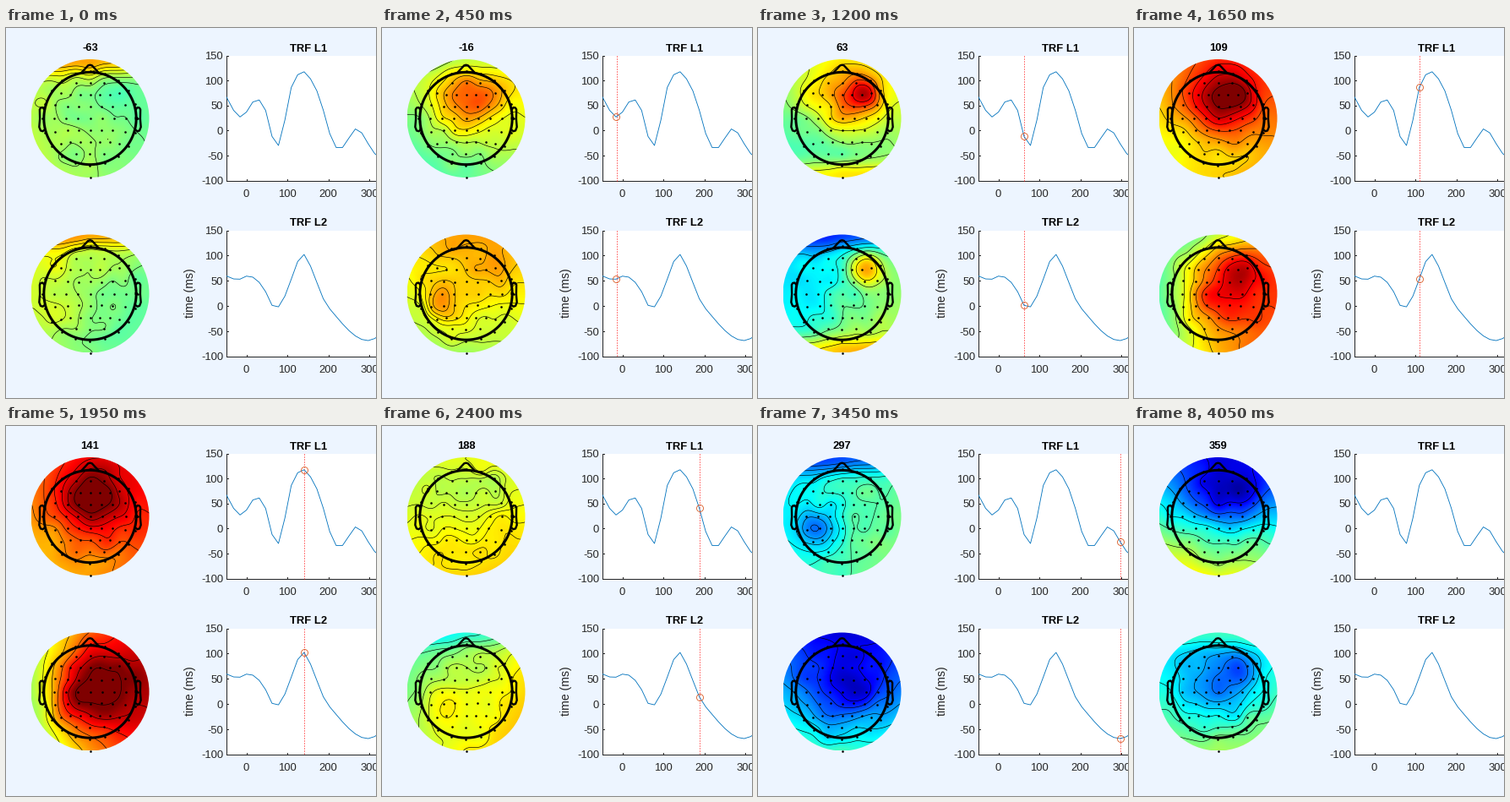
Write a matplotlib script that moves like this. It is 438 px wide and 438 px high and loops after 4200 ms.

```python
import numpy as np
import matplotlib.pyplot as plt
from matplotlib.animation import FuncAnimation
from matplotlib.colors import ListedColormap
from matplotlib.patches import Circle, Rectangle

SIZE, FRAMES, STEP_MS = 438, 28, 150
START, RATE = -62.5, 15.625      # ms of signal, at the start and per frame
PT = 72 / 73                     # one pixel in points at 73 dpi
INK = "#262626"
DISC, SCALE = 70, 110            # map radius, pixels per head unit

plt.rcParams["font.family"] = "Liberation Sans"
fig = plt.figure(figsize=(6, 6), dpi=73, facecolor=(0.93, 0.96, 1))
ax = fig.add_axes([0, 0, 1, 1])
ax.set_xlim(0, SIZE)
ax.set_ylim(SIZE, 0)
ax.axis("off")
ax.set_autoscale_on(False)


def jet():
    v = np.linspace(0, 1, 256)[:, None]
    return ListedColormap(np.clip(1.5 - np.abs(4 * v - [3, 2, 1]), 0, 1))


def label(x, y, text, size=13, **kw):
    kw = {"ha": "center", "va": "baseline", "color": INK, **kw}
    return ax.text(x, y, text, fontsize=size * PT, **kw)


def line(x, y, color, width, **kw):
    return ax.plot(x, y, color=color, lw=width * PT, **kw)[0]


def glide(keys, values, at):
    """Smooth cubic path through key values."""
    k, v = np.array(keys, float), np.array(values, float)
    slope = np.gradient(v, k, axis=0)
    i = np.clip(np.searchsorted(k, at, "right") - 1, 0, len(k) - 2)
    h = k[i + 1] - k[i]
    u = (at - k[i]) / h
    return (((1 + 2 * u) * v[i] + h * u * slope[i]) * (1 - u) ** 2
            + ((3 - 2 * u) * v[i + 1] - h * (1 - u) * slope[i + 1]) * u ** 2)


# ---- scalp maps -------------------------------------------------------

def electrodes():
    """Cap positions from inclination and azimuth, in map radii."""
    quarter = [(92, 72), (92, 54), (74, 68), (50, 68), (60, 51), (75, 41),
               (92, 36), (92, 18), (72, 21), (50, 28), (32, 45)]
    spots = [(0, 0), (115, -90)]
    spots += [(inc, az) for inc in (23, 46, 69, 92)
              for az in (0, 90, 180, 270)]
    for inc, az in quarter:
        spots += [(inc, a) for a in (az, -az, 180 - az, az - 180)]
    inc, az = np.array(spots).T
    r, a = inc / 180 * SCALE / DISC, np.radians(az)
    return np.c_[r * np.cos(a), r * np.sin(a)]


axis = np.linspace(-1, 1, 81)
GX, GY = np.meshgrid(axis, axis)
INSIDE = np.hypot(GX, GY) <= 1
CAP = electrodes()


def blob(x, y, radius):
    return np.exp(-((GX - x) ** 2 + (GY - y) ** 2) / radius ** 2)


def strip(edge):
    return np.exp(-((GY - edge) / .25) ** 2)


RIPPLE = np.array([blob(x, y, .16) for x, y in CAP])
rng = np.random.default_rng(4)

# strength of each spatial mode at the key frames
KEYS = [0, 3, 8, 13, 18, 23, 27]
COURSE_1 = {
    "level": [.52, .55, .52, .78, .48, .43, .38],
    "front": [-.01, .08, .08, .06, -.12, -.03, -.24],
    "right": [-.04, .05, .04, .06, 0, .06, -.05],
    "core": [-.02, .20, .20, .25, -.20, .02, -.20],
    "spot": [-.03, .05, .26, 0, 0, 0, -.10],
    "left": [0, 0, -.04, 0, 0, -.18, 0],
    "brow": [.20, -.10, 0, 0, .06, -.20, 0]}
COURSE_2 = {
    "level": [.53, .61, .44, .70, .47, .30, .44],
    "front": [.03, .08, -.04, .02, -.10, -.14, -.10],
    "right": [-.05, .02, .08, .20, 0, -.02, .02],
    "core": [0, .04, 0, .36, -.25, -.20, -.18],
    "spot": [0, .04, .28, 0, 0, 0, -.12],
    "left": [.02, .12, -.05, .05, .08, 0, 0],
    "brow": [.16, .02, -.22, 0, -.20, -.04, .12]}


class Scalp:
    def __init__(self, cx, cy, core, course):
        self.cx, self.cy, self.course = cx, cy, course
        self.modes = {
            "level": np.ones_like(GX), "front": GY, "right": GX,
            "core": blob(*core), "spot": blob(.4, .42, .28),
            "left": blob(-.42, -.2, .35), "brow": strip(1)}
        self.noise = rng.normal(0, .014, (len(KEYS), len(CAP)))
        self.disc = ax.add_patch(Circle((cx, cy), DISC, fc="none", ec="none"))
        self.image = ax.imshow(
            GX, cmap=jet(), vmin=0, vmax=1, aspect="auto",
            extent=(cx - DISC, cx + DISC, cy + DISC, cy - DISC),
            origin="lower", interpolation="bilinear", zorder=1)
        self.image.set_clip_path(self.disc)
        self.lines = None
        self.outline()

    def outline(self):
        def stroke(x, y, width):
            line(self.cx + SCALE * np.array(x), self.cy - SCALE * np.array(y),
                 "k", width, zorder=4)

        a = np.linspace(0, 2 * np.pi, 200)
        stroke(.497 * np.cos(a), .497 * np.sin(a), 3)
        stroke([.09, .02, 0, -.02, -.09], [.495, .57, .575, .57, .495], 2.4)
        ear_x = np.array([.492, .51, .53, .542, .54, .547, .532, .51, .484])
        ear_y = [.0955, .1175, .1146, .0955, -.0055, -.0932, -.1313,
                 -.1384, -.1199]
        for side in (1, -1):
            stroke(side * ear_x, ear_y, 2.4)
        ax.scatter(self.cx + DISC * CAP[:, 0], self.cy - DISC * CAP[:, 1],
                   s=(2.6 * PT) ** 2, c="k", lw=0, zorder=5)

    def field(self, frame):
        z = np.tensordot(glide(KEYS, self.noise, frame), RIPPLE, 1)
        for name, mode in self.modes.items():
            z = z + glide(KEYS, self.course[name], frame) * mode
        return z + .2 * np.exp(-((frame - 8) / 2.5) ** 2) * strip(-1)

    def show(self, frame):
        z = self.field(frame)
        self.image.set_data(z)
        if self.lines:
            self.lines.remove()
        levels = np.linspace(z[INSIDE].min(), z[INSIDE].max(), 8)[1:-1]
        self.lines = ax.contour(
            self.cx + DISC * GX, self.cy - DISC * GY, z, levels, colors="k",
            linestyles="solid", linewidths=.65 * PT, zorder=3)
        self.lines.set_clip_path(self.disc)


# ---- response curves --------------------------------------------------

LEFT = 261


def time_x(t):
    return 284.6 + .4855 * t


class Response:
    def __init__(self, top, bottom, title, points):
        box = ax.add_patch(Rectangle((LEFT, top), SIZE, bottom - top,
                                     fc="w", ec="none"))
        edge, base = LEFT - .5, bottom - .5

        def value_y(v):
            return base - (v + 100) / 250 * (bottom - top)

        frames = np.arange(FRAMES)
        self.x = time_x(START + RATE * frames)
        self.y = [value_y(glide(*zip(*points), f)) for f in frames]
        curve = line(self.x, self.y, "#0072BD", .85, zorder=3)
        curve.set_clip_path(box)
        line([edge, edge, SIZE + 5], [top, base, base], INK, 1, zorder=2)
        for v in range(-100, 151, 50):
            y = value_y(v)
            line([edge, edge + 2], [y, y], INK, 1, zorder=2)
            label(257, y + 4.8, str(v), ha="right")
        for t in range(0, 301, 100):
            x = time_x(t)
            line([x, x], [base, base - 2], INK, 1, zorder=2)
            label(x, bottom + 19, str(t))
        label(358, top - 5.5, title, weight="bold", color="k")
        self.cursor = line([0, 0], [top, bottom], "r", 1, zorder=2,
                           linestyle=(0, (1, 2)))
        self.dot = line([0], [0], "none", 0, marker="o", ms=8 * PT, mfc="none",
                        mec="#D95319", mew=.8 * PT, zorder=4)

    def show(self, frame):
        x = self.x[frame]
        self.cursor.set_xdata([int(x) + .5] * 2)
        self.dot.set_data([x], [self.y[frame]])
        for part in (self.cursor, self.dot):
            part.set_visible(x >= LEFT)


# frame and value at the bends of each curve
BENDS_1 = [(0, 88), (3, 27), (6, 61), (7, 40), (8, -12), (9, -30), (11, 86),
           (12.5, 117), (15, 79), (18, -34), (19, -34), (21, 3), (24, -46),
           (27, -75)]
BENDS_2 = [(0, 64), (3, 53), (4, 59), (5, 57), (7, 28), (8, 1), (9, -2),
           (11, 53), (12, 88), (13, 102), (14, 79), (16, 14), (18, -21),
           (23, -69), (27, -35)]

parts = [Scalp(99.5, 107, (0, .3, .55), COURSE_1),
         Scalp(99.5, 314.5, (.05, .05, .7), COURSE_2),
         Response(33, 181, "TRF L1", BENDS_1),
         Response(240, 389, "TRF L2", BENDS_2)]
label(218, 313.5, "time (ms)", 14, rotation=90, va="center")
clock = label(99.5, 27, "", weight="bold", color="k")


def draw(frame):
    t = START + RATE * frame
    clock.set_text(str(int(np.sign(t) * np.floor(abs(t) + .5))))
    for part in parts:
        part.show(frame)
    return []


anim = FuncAnimation(fig, draw, frames=FRAMES, interval=STEP_MS,
                     init_func=lambda: draw(0), repeat=True, blit=False)
plt.show()
```
